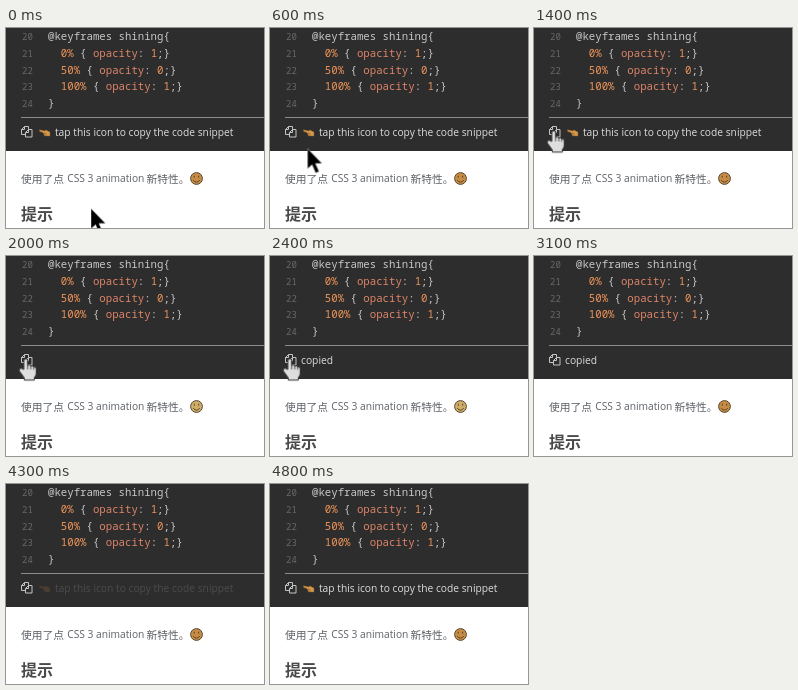
Recreate the animation shown at these times as an HTML page. Size 258 by 200 pixels, loop 5000 ms.

```html
<!DOCTYPE html>
<html lang="zh">
<head>
<meta charset="utf-8">
<title>Copy snippet</title>
<style>
  html, body { margin: 0; width: 100%; height: 100%; overflow: hidden; background: #fff; }
  svg { display: block; width: 258px; height: 200px; }
  text { white-space: pre; }
  .code { font: 500 10.7px "Noto Sans Mono", "DejaVu Sans Mono", monospace; fill: #c8c8c8; }
  .line-no { font: 9px "Noto Sans Mono", monospace; fill: #686868; }
  .num { fill: #f0955a; }
  .prop { fill: #de8568; }
  .label { font: 10.27px "Open Sans", sans-serif; fill: #ddd; }
  .note { font: 10.23px "Open Sans", "Noto Sans CJK SC", "Noto Sans CJK", sans-serif; fill: #5c6066; }
  .cjk { font-size: 10.75px; font-family: "Noto Sans CJK SC", "Noto Sans CJK", sans-serif; }
  .title { font: bold 16px "Noto Sans CJK SC", "Noto Sans CJK", sans-serif; fill: #4a4a4a; }

  .tip, .copied, .face, .arrow, .hand { animation: 5s linear infinite; }
  .tip { animation-name: tip; }
  .copied { animation-name: copied; }
  .face { animation-name: face; animation-timing-function: step-end; }
  .arrow { animation-name: travel; }
  .hand { animation-name: press; animation-timing-function: step-end; }

  /* each label shines out, swaps and shines back in */
  @keyframes tip { 0%, 34% { opacity: 1; } 40%, 85% { opacity: 0; } 91%, 100% { opacity: 1; } }
  @keyframes copied { 0%, 40% { opacity: 0; } 46%, 79% { opacity: 1; } 85%, 100% { opacity: 0; } }
  @keyframes face { 0% { fill: #c88d45; } 40% { fill: #cfae68; } 52%, 100% { fill: #c88d45; } }
  @keyframes travel {
    0%, 2% { transform: translate(85px, 180.5px); opacity: 1; animation-timing-function: steps(5); }
    12% { transform: translate(37.5px, 120.5px); opacity: 1; animation-timing-function: steps(3); }
    17.99% { transform: translate(20px, 102px); opacity: 1; animation-timing-function: step-end; }
    18%, 100% { transform: translate(20px, 102px); opacity: 0; }
  }
  @keyframes press { 0% { opacity: 0; } 18% { opacity: 1; } 54%, 100% { opacity: 0; } }
</style>
</head>
<body>
<svg viewBox="0 0 258 200">
  <rect width="258" height="123" fill="#2d2d2d"/>
  <g id="code"></g>
  <path d="M15 89.5H258" stroke="#8c8c8c"/>

  <g fill="none" stroke="#c4c4c4" stroke-linejoin="round">
    <path d="M19 106.5H15.5V101.5L18.5 98.5H22.5V101M18.5 98.5V101.5H15.5"/>
    <path d="M19.5 104.5L22.5 101.5H26V109H19.5ZM22.5 101.5V104.5H19.5"/>
  </g>

  <g class="tip">
    <path d="M33.5 101.8L38.5 102.8L40 102L44 104V108H38.5L37 104.6L33.5 103.6Z"
          fill="#d99a4c" stroke="#7a5028" stroke-width=".5" stroke-linejoin="round"/>
    <path d="M38 105.3H40.5M38.4 106.8H40.5" stroke="#7a5028" stroke-width=".6"/>
    <text class="label" x="49" y="107.7">tap this icon to copy the code snippet</text>
  </g>
  <text class="label copied" x="31" y="107.7">copied</text>

  <text class="note cjk" x="15" y="154.6">使用了点</text>
  <text class="note" x="61.2" y="154.4">CSS 3 animation</text>
  <text class="note cjk" x="140.5" y="154.6">新特性。</text>
  <circle class="face" cx="190.5" cy="150.5" r="5.9" fill="#c88d45" stroke="#584632"/>
  <path d="M188.3 147.7V149.7M192.7 147.7V149.7M187.2 152.2Q190.5 156 193.8 152.2"
        fill="none" stroke="#584632"/>

  <text class="title" x="15" y="192">提示</text>

  <path class="arrow" d="M0 0V20.3L4.6 16.3L8.1 24.6L11.6 23.1L8 15H14.6Z"
        fill="#000" stroke="#fff" stroke-width=".4"/>

  <g class="hand" stroke="#333" stroke-linejoin="round" transform="translate(-1.2 -.6)">
    <path d="M19 114V105Q19 103.4 20.9 103.4T22.8 105V110
             Q24.5 108.8 26 110.6Q27.7 109.8 28.8 111.4Q31.4 111 31.4 113.5
             V118Q31.4 120.5 29.6 122V124.7H19.5V122.5L14.5 115.6
             Q14 113 16.3 112.8Z" fill="#dedede"/>
    <path d="M22.8 110V114M26 110.8V114M28.8 111.6V114.3" stroke-width=".8"/>
  </g>
</svg>
<script>
  const num = s => `<tspan class="num">${s}</tspan>`;
  const rule = (at, value) =>
    `  ${num(at)} { <tspan class="prop">opacity</tspan>: ${num(value)};}`;
  const lines = ["@keyframes shining{", rule("0%", 1), rule("50%", 0), rule("100%", 1), "}"];

  document.getElementById("code").innerHTML = lines.map((line, i) => {
    const y = 12.2 + i * 16.7;
    return `<text class="line-no" x="16" y="${y}">${20 + i}</text>
      <text class="code" x="42" y="${y}">${line}</text>`;
  }).join("");
</script>
</body>
</html>
```
